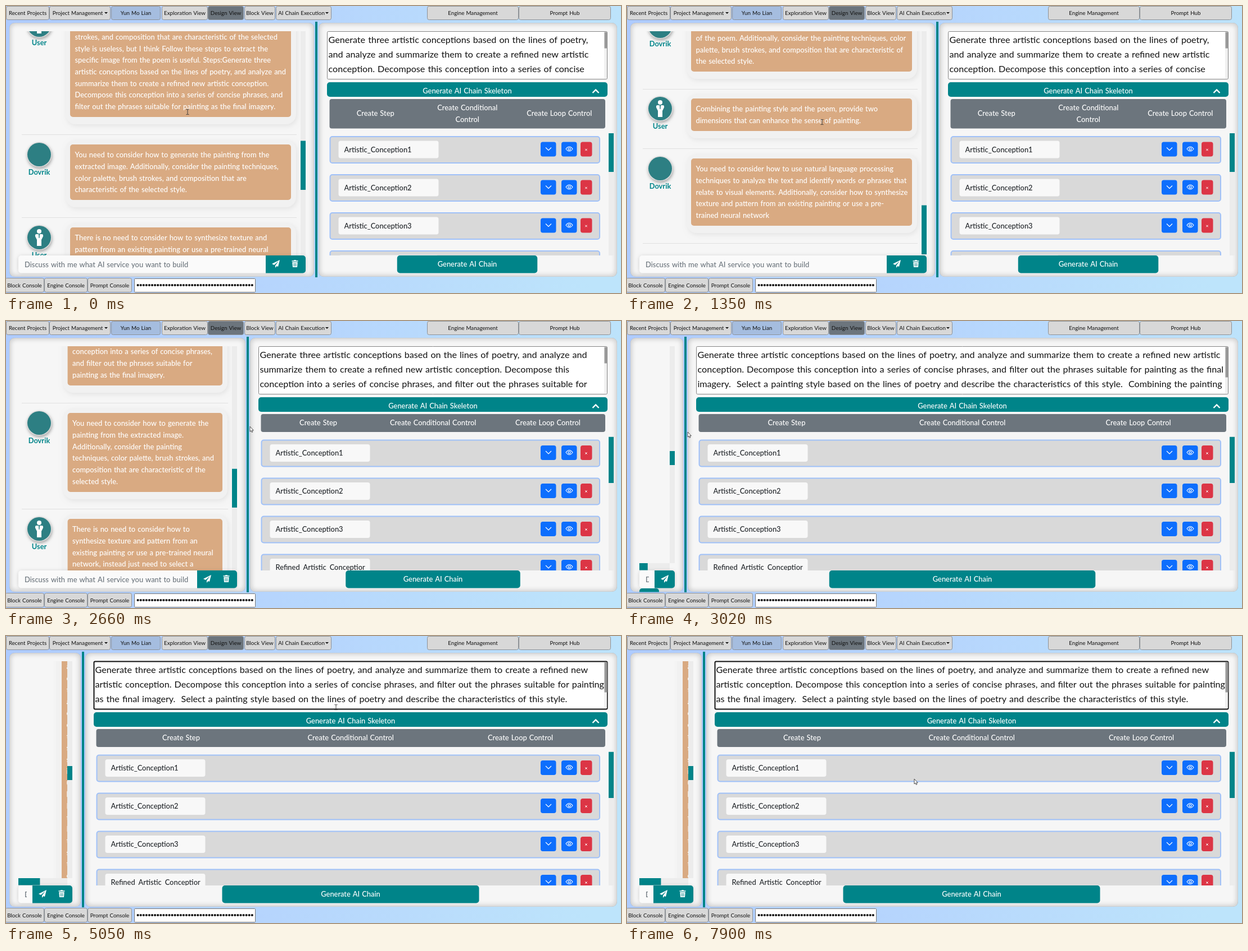
An HTML page with a canvas for the animation above (8 s loop, 1094x512 px).

```html
<!DOCTYPE html>
<html lang="en">
<head>
<meta charset="utf-8">
<title>AI chain design view</title>
<style>
html, body { margin: 0; width: 100%; height: 100%; overflow: hidden; }
canvas { display: block; }
</style>
</head>
<body>
<canvas width="1094" height="512"></canvas>
<script>
const ctx = document.querySelector('canvas').getContext('2d');
const LOOP = 8000, TEAL = '#008489', INK = '#212529';
const BODY = 12.87, SMALL = 9.78, LARGE = 16.12, LINE = 20.7;

const MESSAGES = [
  ['User', 'It is good to consider painting techniques, brush\nstrokes, and composition that are characteristic of the selected\nstyle is useless, but I think Follow these steps to extract the\nspecific image from the poem is useful. Steps:Generate three\nartistic conceptions based on the lines of poetry, and analyze and\nsummarize them to create a refined new artistic conception.\nDecompose this conception into a series of concise phrases, and\nfilter out the phrases suitable for painting as the final imagery.'],
  ['Dovrik', 'You need to consider how to generate the painting from the\nextracted image. Additionally, consider the painting techniques,\ncolor palette, brush strokes, and composition that are\ncharacteristic of the selected style.'],
  ['User', 'There is no need to consider how to synthesize texture and\npattern from an existing painting or use a pre-trained neural\nnetwork, instead just need to select a painting style based on\npoem and describe the characteristics of this style.'],
  ['Dovrik', 'You need to determine the painting style suitable for the content\nof the poem. Additionally, consider the painting techniques, color\npalette, brush strokes, and composition that are characteristic of\nthe selected style.'],
  ['User', 'Combining the painting style and the poem, provide two\ndimensions that can enhance the sense of painting.'],
  ['Dovrik', 'You need to consider how to use natural language processing\ntechniques to analyze the text and identify words or phrases that\nrelate to visual elements. Additionally, consider how to synthesize\ntexture and pattern from an existing painting or use a pre-\ntrained neural network']
];
const PROMPT = 'Generate three artistic conceptions based on the lines of poetry, and analyze and summarize them to create a refined new artistic conception. Decompose this conception into a series of concise phrases, and filter out the phrases suitable for painting as the final imagery.  Select a painting style based on the lines of poetry and describe the characteristics of this style.  Combining the painting style and the poem, provide two dimensions that can enhance the sense of painting.';
const STEPS = ['Artistic_Conception1', 'Artistic_Conception2', 'Artistic_Conception3', 'Refined_Artistic_Conception'];

// Motion: [time, value...]
const SCROLL = [[0, 0], [120, 55], [600, 338], [840, 420], [1110, 450], [1230, 525], [1350, 525], [1470, 500], [1860, 200], [2010, 166]];
const DIVIDER = [[2260, 552], [2540, 520], [2660, 430], [2780, 310], [2900, 190], [3020, 104], [3150, 104], [3290, 121], [3410, 130], [3560, 137]];
const MOUSE = [[0, 323, 189], [600, 325, 196], [1350, 347, 207], [1470, 360, 207], [1860, 548, 180], [2010, 548, 180],
  [2260, 552, 183], [2540, 524, 185], [3020, 108, 198], [3560, 141, 190], [3680, 178, 64], [4070, 200, 66],
  [4790, 579, 103], [4910, 605, 106], [5050, 587, 127], [5190, 587, 127], [5340, 616, 115], [5480, 630, 112],
  [6200, 805, 129], [6630, 1000, 150], [6870, 1020, 178], [7230, 657, 90], [7640, 657, 89], [7780, 600, 170], [7900, 511, 255]];
const RUNS = [0, 1110, 1620, 2010, 2260, 2540, 3290, 3560, 4070, 5050, 5190, 5340, 5480, 6630, 7640, 7780];

// The screen refreshes in runs of 120 ms ticks.
function snap(t) {
  const start = RUNS.findLast(r => r <= t);
  return start + Math.floor((t - start) / 120) * 120;
}

function at(keys, t) {
  const i = keys.findIndex(k => k[0] > t);
  if (i < 0) return keys.at(-1).slice(1);
  if (i === 0) return keys[0].slice(1);
  const a = keys[i - 1], b = keys[i], f = (t - a[0]) / (b[0] - a[0]);
  return a.slice(1).map((v, j) => v + (b[j + 1] - v) * f);
}

function setFont(size, weight = size === BODY ? 500 : 400) {
  ctx.font = `${weight} ${size}px Lato, sans-serif`;
  ctx.wordSpacing = size * 0.06 + 'px';
}

function text(str, x, y, size, color, align = 'left', weight) {
  setFont(size, weight);
  ctx.fillStyle = color;
  ctx.textAlign = align;
  ctx.fillText(str, x, y + size * 0.36);
}

function wrap(str, width, size) {
  setFont(size);
  const lines = [];
  let line = '';
  for (const word of str.split(' ')) {
    const next = line ? line + ' ' + word : word;
    if (line && ctx.measureText(next).width > width) {
      lines.push(line);
      line = word;
    } else line = next;
  }
  return [...lines, line];
}

function rect(x, y, w, h, fill, radius = 0, stroke, lineWidth = 1) {
  ctx.beginPath();
  ctx.roundRect(x, y, Math.max(w, 0), h, radius);
  if (fill) { ctx.fillStyle = fill; ctx.fill(); }
  if (stroke) { ctx.strokeStyle = stroke; ctx.lineWidth = lineWidth; ctx.stroke(); }
}

function circle(x, y, r, fill) {
  ctx.beginPath();
  ctx.arc(x, y, r, 0, 7);
  ctx.fillStyle = fill;
  ctx.fill();
}

function clipped(x, y, w, h, draw) {
  ctx.save();
  ctx.beginPath();
  ctx.rect(x, y, Math.max(w, 0), h);
  ctx.clip();
  draw();
  ctx.restore();
}

function icon(path, x, y, fill, stroke, lineWidth = 1) {
  ctx.save();
  ctx.translate(x, y);
  const shape = new Path2D(path);
  if (fill) { ctx.fillStyle = fill; ctx.fill(shape); }
  if (stroke) { ctx.strokeStyle = stroke; ctx.lineWidth = lineWidth; ctx.stroke(shape); }
  ctx.restore();
}

function withShadow(color, blur, dx, dy, draw) {
  ctx.save();
  Object.assign(ctx, { shadowColor: color, shadowBlur: blur, shadowOffsetX: dx, shadowOffsetY: dy });
  draw();
  ctx.restore();
}

function tab(label, x, y, w, h, fill = '#d8d8d8', menu = false) {
  rect(x + .5, y + .5, w - 1, h - 1, fill, 3, '#8d9196');
  text(label, x + w / 2 - (menu ? 4 : 0), y + h / 2, SMALL, '#111', 'center');
  if (menu) icon('M-3 -1.5H3L0 1.5Z', x + w - 8, y + h / 2, '#111');
}

function chrome() {
  const sky = ctx.createLinearGradient(0, 0, 1094, 200);
  sky.addColorStop(0, '#aecbff');
  sky.addColorStop(.5, '#b6d5fd');
  sky.addColorStop(1, '#bde4fb');
  rect(0, 0, 1094, 512, sky);
  tab('Recent Projects', 0, 0, 77, 25);
  tab('Project Management', 77, 0, 109, 25, undefined, true);
  tab('Yun Mo Lian', 187, 0, 88, 25, '#a5bddf');
  tab('Exploration View', 277, 0, 82, 25);
  tab('Design View', 359, 0, 64, 25, '#6c757d');
  tab('Block View', 424, 0, 55, 25);
  tab('AI Chain Execution', 480, 0, 99, 25, undefined, true);
  tab('Engine Management', 749, 0, 163, 25);
  tab('Prompt Hub', 912, 0, 164, 25);
  tab('Block Console', -2, 485, 70, 26);
  tab('Engine Console', 68, 485, 77, 26);
  tab('Prompt Console', 145, 485, 79, 26);
  rect(228.5, 486.5, 215, 24, '#fff', 1, '#777');
  for (let i = 0; i < 41; i++) circle(234.6 + i * 5.08, 498, 2.1, '#111');
}

function panel(x, right) {
  const w = right - x;
  rect(x, 30, w, 453, '#f6f6f6', 9);
  ctx.save();
  ctx.clip();
  withShadow('rgba(60,60,60,.65)', 9, 0, 0, () => rect(x - 1, 29, w + 2, 455, null, 10, '#a5a9ad', 2.5));
  ctx.restore();
}

function avatar(name, y) {
  withShadow('rgba(0,0,0,.3)', 5, 1, 3, () => circle(59, y, 22.5, '#dcdcdc'));
  circle(59, y, 21, '#2d7f83');
  if (name === 'User') {
    circle(59, y - 11, 4, '#fff');
    icon('M-5 -6H5Q7.5 -6 7 -2L4 4V15H-4V4L-7 -2Q-7.5 -6 -5 -6Z', 59, y, '#fff');
    icon('M-1 -6H1L.6 1H-.6Z', 59, y, '#2d7f83');
  }
  text(name, 59, y + 31, BODY, TEAL, 'center', 700);
}

function chat(split, scroll) {
  const x = 99 + (split - 137) * 15 / 415;
  const width = Math.max(split - 45 - x, 18);
  let offset = 16.3 - scroll;
  for (const [name, message] of MESSAGES) {
    const lines = split === 552 ? message.split('\n') : wrap(message.replaceAll('\n', ' '), width - 17, BODY);
    const height = Math.round(lines.length * LINE + 16.5), top = Math.round(offset);
    if (top < 460 && top + height > 20) {
      withShadow('rgba(0,0,0,.07)', 8, 2, 3, () => rect(x - 8, top - 8, width + 17, height + 21, '#f1f1f1', 18));
      rect(x, top, width, height, '#d9aa82', 5);
      lines.forEach((line, i) => text(line, x + 8.5, top + 18.5 + i * LINE, BODY, '#fff'));
      avatar(name, top + 18);
    }
    offset += lines.length * LINE + 65;
    rect(28, Math.round(offset - 17.5), split - 63, 1, '#e0e0e0');
  }
}

function leftPane(split, scroll) {
  const right = split - 19, view = right - 31, narrow = split < 200;
  const bottom = narrow ? 432 : 445;
  panel(6, split - 4);
  clipped(22, 45, view, bottom - 45, () => chat(split, scroll));
  rect(right - 9, 45, 9, bottom - 45, '#ececec');
  const f = Math.min(1, (552 - split) / 415);
  const thumbTop = 45 + (903 + scroll) * .2188 - 2;
  rect(right - 9, thumbTop + (232 - thumbTop) * f, 9, 87.5 - 62.5 * f, TEAL);
  if (narrow) {
    rect(22, 432, view, 12.5, '#ececec');
    rect(22, 432, view * view / 197, 12.5, TEAL);
  }

  const stacked = split < 125, buttons = stacked ? 36 : 71;
  withShadow('rgba(0,0,0,.16)', 6, 0, 0, () => rect(22, 446, right - 22, 30, '#f4f4f4', 6));
  rect(22, 445, right - buttons - 22, 31.5, '#fafafa', [5, 0, 0, 5]);
  clipped(33, 445, right - buttons - 43, 32, () =>
    text('Discuss with me what AI service you want to build', 33, 461, BODY, '#6c757d'));
  rect(right - buttons, 445, buttons, 31.5, TEAL, [0, 5, 5, 0]);
  icon('M7 -7L-7 0L-3 2L5 -5L-1 3V7L1.5 4L4 5Z', right - buttons + 18, 460, '#fff');
  if (stacked) rect(22, 477, 35, 6.5, TEAL, [5, 5, 0, 0]);
  else {
    icon('M-5.5 -5H5.5M-2 -6H2', right - 19, 460, null, '#fff', 1.6);
    icon('M-4.7 -3.2H4.7L4 6H-4Z', right - 19, 460, '#fff');
    icon('M-2 -1.5V4.5M0 -1.5V4.5M2 -1.5V4.5', right - 19, 460, null, TEAL, .8);
  }
}

function step(label, x, y) {
  rect(x + 1, y + 1, 1055 - x, 47, '#d9d9d9', 4, '#a0c1f8', 2);
  rect(x + 16, y + 8.5, 178, 31, '#f8f8f8', 4);
  clipped(x + 26, y, 159, 48, () => text(label, x + 26, y + 24, BODY, INK));
  rect(951, y + 10.5, 27.5, 26, '#0d6efd', 4);
  icon('M-5 -2.5L0 2.5L5 -2.5', 965, y + 23, null, '#fff', 1.2);
  rect(988, y + 10.5, 27.5, 26, '#0d6efd', 4);
  icon('M-6 0Q0 -8 6 0Q0 8 -6 0Z', 1002, y + 23, null, '#fff', 1.1);
  icon('M2 0A2 2 0 1 1 -2 0A2 2 0 1 1 2 0', 1002, y + 23, null, '#fff', 1.1);
  rect(1022, y + 10.5, 20.5, 26, '#dc3545', 4);
  icon('M-1.7 -1.7L1.7 1.7M1.7 -1.7L-1.7 1.7', 1032, y + 24.5, null, '#fff', 1);
}

function rightPane(split, focused, caret) {
  const x = split + 19, mid = (x + 1070) / 2, tight = split > 490;
  panel(split + 4, 1087);

  rect(x + .5, 45.5, 1069 - x, 85, '#fff', 2, focused ? '#111' : '#858585', focused ? 2 : 1);
  clipped(x, 46, 1064 - x, 84, () =>
    wrap(PROMPT, 1085 - 1.05 * (x + 3), LARGE).forEach((line, i) => text(line, x + 2.5, 60 + i * 25.9, LARGE, '#111')));
  rect(1064, 47, 5, 82, '#f0f0f0');
  rect(1064.5, 46.5, 5, split > 300 ? 29 : 54, '#999');
  if (caret) rect(177, 50, 1, 21, '#111');

  rect(x, 136, 1070 - x, 26, TEAL, 5);
  text('Generate AI Chain Skeleton', mid, 151.5, BODY, '#fff', 'center');
  icon('M-5.5 3L0 -2.5L5.5 3', 1049, 152, null, '#fff', 2.4);

  const left = x + 4.5, third = (1066 - left) / 3, groupHeight = tight ? 52.5 : 32;
  rect(left, 166, third * 3, groupHeight, '#6c757d', 4);
  const y = 166 + groupHeight / 2 - .5;
  const label = (str, i, dy = 0) => text(str, left + third * (i + .5), y + dy, BODY, '#fff', 'center');
  label('Create Step', 0);
  if (tight) {
    label('Create Conditional', 1, -10.4);
    label('Control', 1, 10.4);
  } else label('Create Conditional Control', 1);
  label('Create Loop Control', 2);

  const listTop = tight ? 227 : 206.5;
  clipped(x, listTop, 1082 - x, 445 - listTop, () => {
    STEPS.forEach((name, i) => step(name, left, listTop + 5 + i * 68));
    rect(1072, listTop, 9, 445 - listTop, '#ececec');
    rect(1072, listTop, 9, tight ? 69 : 82.5, TEAL);
  });

  const half = (1070 - x) / 2;
  rect(mid - half / 2, 445, half, 31.5, TEAL, 5);
  text('Generate AI Chain', mid, 460.5, BODY, '#fff', 'center');
}

function pointer(t, x, y) {
  if (t >= 2260 && t < 2540) {
    icon('M-1 -6V6M1 -6V6M-1 0H-5M1 0H5M-3.5 -2L-5.5 0L-3.5 2M3.5 -2L5.5 0L3.5 2', x, y, null, '#222');
  } else if (t < 1700 || (t >= 3680 && y < 132)) {
    icon('M-2.5 -4.5H-.8L0 -4L.8 -4.5H2.5M0 -4V4M-2.5 4.5H-.8L0 4L.8 4.5H2.5', x, y, null, '#333', .9);
  } else {
    icon('M0 0V9L2 7.3L3.4 10.3L4.9 9.6L3.6 6.8H6.3Z', x, y, '#fff', '#222', .8);
  }
}

function draw(now) {
  const t = snap(now % LOOP);
  const [scroll] = at(SCROLL, t), [split] = at(DIVIDER, t), [x, y] = at(MOUSE, t);
  const focused = t >= 3680;
  const caret = focused && t < 6400 && Math.floor((t - 3410) / 500) % 2 === 0;
  chrome();
  leftPane(split, scroll);
  rightPane(split, focused, caret);
  rect(split - 2, 28, 4, 456, TEAL);
  const dragging = t >= 2540 && t < 3600;
  pointer(t, dragging ? split + 4 : x, y);
  requestAnimationFrame(draw);
}
requestAnimationFrame(draw);
</script>
</body>
</html>
```
